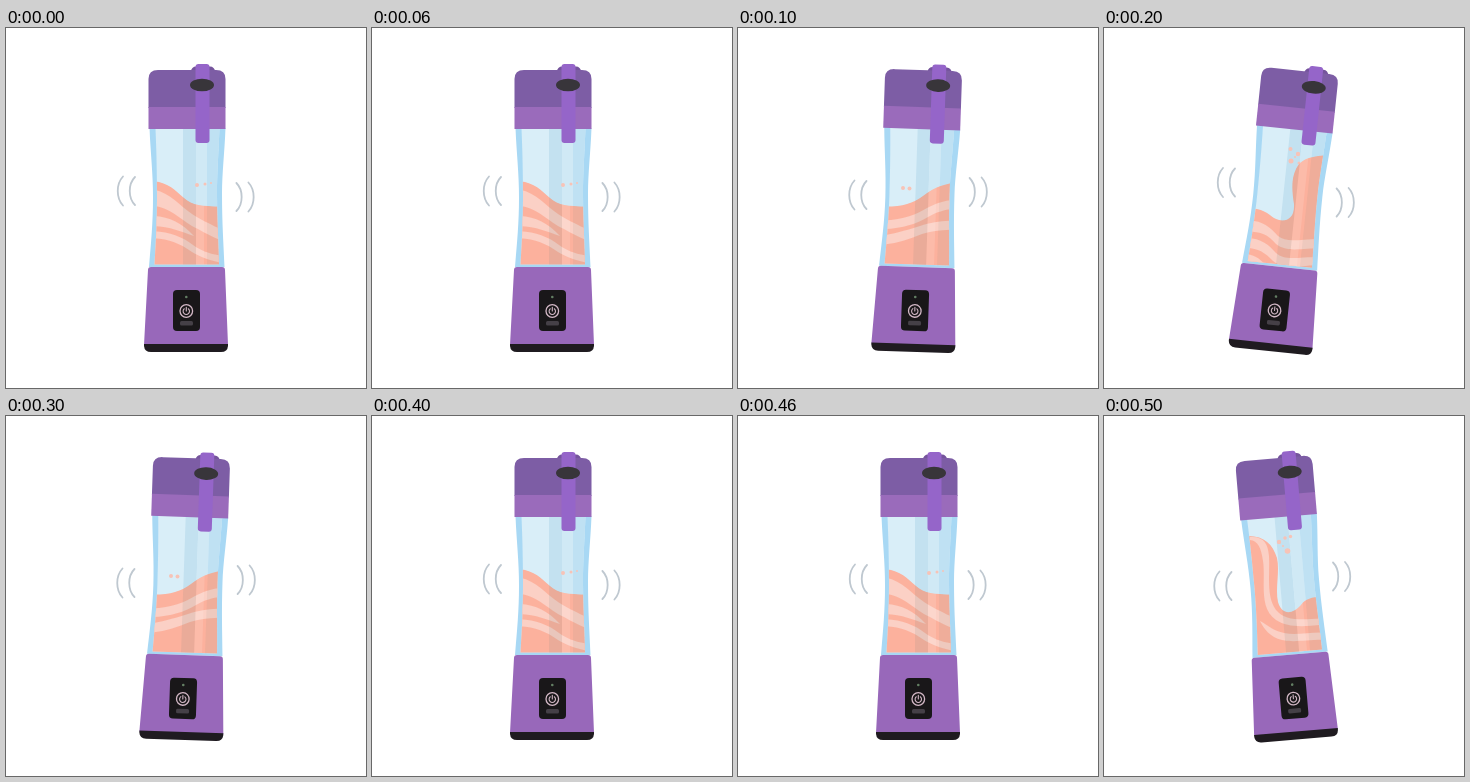
An HTML page with a canvas that plays this animation: 360 px wide and 360 px high, repeating every 0.6 s.

```html
<!DOCTYPE html>
<html lang="en">
<head>
<meta charset="utf-8">
<title>Shaking blender</title>
<style>
html, body { margin: 0; width: 100%; height: 100%; overflow: hidden; background: #fff; }
canvas { display: block; width: 360px; height: 360px; }
</style>
</head>
<body>
<canvas id="stage"></canvas>
<script>
const canvas = document.getElementById('stage');
const ctx = canvas.getContext('2d');
const dpr = window.devicePixelRatio || 1;
canvas.width = canvas.height = 360 * dpr;

const STEP = 100;
const ORDER = [0, 1, 2, 1, 0, 3];
const CORAL = '#fcb19d', PALE = '#fbd0c5';

// Tilt in degrees, sideways shift, shake mark centres, liquid outline, pale waves, drops [x, y, r]
const POSES = [
  {
    tilt: 0, dx: 0, left: [121, 163], right: [238.4, 169],
    liquid: 'M140 153 C160 152 168 161 178 170 C188 179 200 178 225 179 V245 H140Z',
    waves: [
      'M140 161 C162 161 171 176 186 186 C197 193 206 197 225 206 V216 C205 209 198 204 186 198 C170 188 162 178 140 177Z',
      'M140 188 C160 187 174 193 188 208 C174 203 160 197 140 198Z',
      'M140 203 C160 203 174 207 187 217 C197 224 206 227 225 229 V236 C206 234 197 230 186 224 C172 214 160 210 140 210Z'
    ],
    drops: [[191, 157, 2], [199, 156, 1.5], [205, 155, 1]]
  },
  {
    tilt: 1.95, dx: 0, left: [120.5, 167], right: [239.6, 164],
    liquid: 'M135 178 C159 180 173 177 185 168 C196 160 204 156 225 153 V245 H135Z',
    waves: [
      'M135 192 C162 194 177 187 189 180 C201 174 207 172 225 171 V180 C207 181 199 184 190 189 C176 197 161 202 135 201Z',
      'M135 209 C157 206 169 202 182 198 C196 193 207 193 225 192 V201 C208 202 196 202 184 206 C169 212 156 217 135 217Z'
    ],
    drops: [[165, 160, 2], [171.5, 160.5, 2]]
  },
  {
    tilt: 6, dx: 1, left: [123, 154.5], right: [240.6, 174.5],
    liquid: 'M138 180 C157 179 164 185 170 190 C179 195 191 193 190 176 C188 164 187 151 192 141 C198 130 207 128 228 127 V250 H135Z',
    waves: [
      'M135 194 C155 190 164 197 174 208 C184 216 197 210 222 211 V220 C196 220 184 225 172 216 C162 204 154 203 135 204Z',
      'M135 211 C154 208 163 215 172 225 C182 234 195 228 222 229 V237 C194 237 181 243 169 233 C159 222 151 219 135 220Z',
      'M135 226 C149 225 158 230 164 242 H153 C148 235 143 234 135 234Z'
    ],
    drops: [[186.5, 121, 2], [194, 126, 2.2], [187, 133, 2.5], [195, 135, 1.5], [191, 129, 1]]
  },
  {
    tilt: -4.9, dx: .3, left: [119.5, 170], right: [237, 160.5],
    liquid: 'M135 121 C157 117 168 126 173 142 C176 156 171 172 174 186 C178 200 189 198 197 189 C203 181 211 181 228 180 V250 H140Z',
    waves: [
      'M146 121 C160 120 164 128 165 140 C166 160 162 180 172 194 C183 207 201 203 228 202 V208 C203 210 186 213 172 204 C154 192 162 164 159 145 C157 131 154 125 146 124Z',
      'M156 205 C165 210 170 215 180 217 C194 220 207 215 228 217 V224 C204 223 192 227 178 224 C166 221 160 213 156 205Z'
    ],
    drops: [[175, 126, 2.2], [181, 122, 1.8], [183.5, 135, 2.8], [186.5, 120.5, 1.7], [179, 130, 1]]
  }
];

const shapes = {
  glass: new Path2D('M143.5 100 H219.5 C218.5 125 216 145 216 165 C216 195 217.5 215 218.5 239 H143 C145 215 147 195 147 170 C147 145 144.5 125 143.5 100Z'),
  inner: new Path2D('M149.5 100 H213.5 C212.5 125 211 145 211 165 C211 192 212.5 212 213 236.5 H148.5 C150 212 151 192 151 168 C151 145 150.5 125 149.5 100Z'),
  base: new Path2D('M145 239 H216 Q219 239 219 242 L222 317 H138 L142 242 Q142 239 145 239Z'),
  foot: new Path2D('M138 316 H222 V318 Q221.5 324 215 324 H145 Q138.5 324 138 318Z'),
  lid: new Path2D('M142.5 80 V51 Q142.5 42 152 42 H210 Q219.5 42 219.5 51 V80Z')
};

function fill(color, path) {
  ctx.fillStyle = color;
  ctx.fill(path);
}

function box(color, x, y, w, h, r = 0) {
  const p = new Path2D();
  p.roundRect(x, y, w, h, r);
  fill(color, p);
}

function oval(color, x, y, rx, ry = rx) {
  const p = new Path2D();
  p.ellipse(x, y, rx, ry, 0, 0, Math.PI * 2);
  fill(color, p);
}

function line(color, width, d) {
  ctx.strokeStyle = color;
  ctx.lineWidth = width;
  ctx.lineCap = 'round';
  ctx.stroke(new Path2D(d));
}

function lean(pose) {
  ctx.translate(180 + pose.dx, 180);
  ctx.rotate(pose.tilt * Math.PI / 180);
  ctx.translate(-180, -180);
}

function unlean(pose) {
  ctx.translate(180, 180);
  ctx.rotate(-pose.tilt * Math.PI / 180);
  ctx.translate(-180 - pose.dx, -180);
}

function shakeMark([x, y], side) {
  ctx.save();
  ctx.translate(x, y);
  ctx.scale(side, 1);
  line('#bfc8d0', 1.8, 'M-4 -14.5 C-11 -7 -11 7 -4 14.5');
  line('#bfc8d0', 1.8, 'M8 -14 C1 -7 1 7 8 14');
  ctx.restore();
}

function drawGlass(pose) {
  fill('#a8d8f4', shapes.glass);
  ctx.save();
  ctx.clip(shapes.inner);
  box('#d9eef8', 140, 95, 80, 145);
  box('#c3e1f0', 177, 95, 13, 145);
  box('#d0e9f5', 190, 95, 11, 145);
  box('#bfe1f3', 201, 95, 14, 145);

  // The liquid and drops keep their place on the stage while the cup leans.
  ctx.save();
  unlean(pose);
  pose.drops.forEach(([x, y, r]) => oval('#f7c3b7', x, y, r));
  const liquid = new Path2D(pose.liquid);
  fill(CORAL, liquid);
  ctx.clip(liquid);
  pose.waves.forEach(d => fill(PALE, new Path2D(d)));
  lean(pose);
  box('rgba(110,130,125,.13)', 177, 95, 13, 145);
  box('rgba(255,255,255,.12)', 190, 95, 8, 145);
  box('rgba(110,130,125,.09)', 201, 95, 14, 145);
  ctx.restore();
  ctx.restore();
}

function drawBase() {
  fill('#9868ba', shapes.base);
  fill('#1f1b20', shapes.foot);
  box('#191719', 167, 262, 27, 41, 4);
  oval('#648064', 180.3, 269, 1.3);
  const ring = new Path2D();
  ring.arc(180.3, 283, 6.3, 0, Math.PI * 2);
  ctx.strokeStyle = '#d3b8c6';
  ctx.lineWidth = 1.3;
  ctx.stroke(ring);
  line('#d3b8c6', 1.1, 'M178.3 280.8 A3.2 3.2 0 1 0 182.3 280.8 M180.3 279.3 V283');
  box('#454047', 174, 293, 13, 4.5, 1.5);
}

function drawLid() {
  box('#75549c', 185, 38.5, 24, 16, 5);
  fill('#7d5da5', shapes.lid);
  box('#9a6bbb', 142.5, 79, 77, 22);
  box('#9565c9', 189.5, 36, 14, 79, 3);
  oval('#38353a', 196, 57, 12, 6.3);
}

function draw(pose) {
  ctx.setTransform(dpr, 0, 0, dpr, 0, 0);
  ctx.fillStyle = '#fff';
  ctx.fillRect(0, 0, 360, 360);
  shakeMark(pose.left, 1);
  shakeMark(pose.right, -1);
  ctx.save();
  lean(pose);
  drawGlass(pose);
  drawBase();
  drawLid();
  ctx.restore();
}

const start = performance.now();
let shown = -1;

function tick(now) {
  const step = Math.floor(Math.max(0, now - start) / STEP) % ORDER.length;
  if (step !== shown) draw(POSES[ORDER[shown = step]]);
  requestAnimationFrame(tick);
}
tick(start);
</script>
</body>
</html>
```
